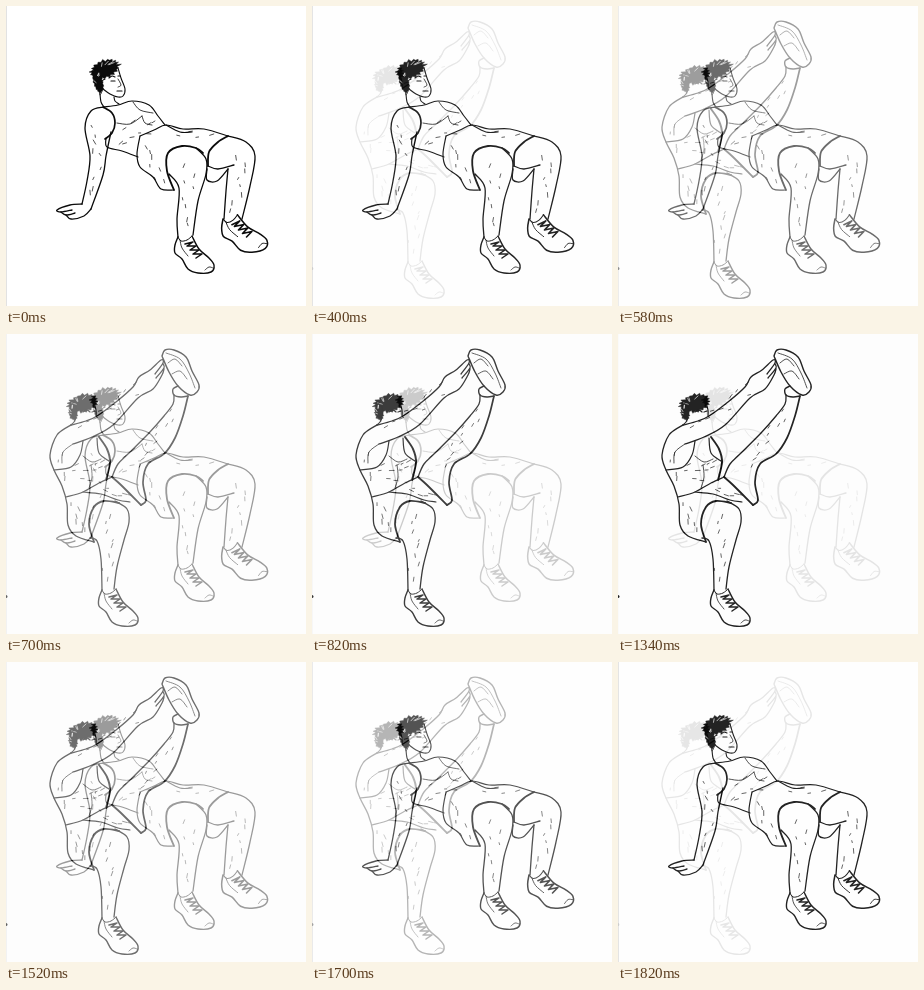
Animation, 300 px wide and 300 px high, one loop 1880 ms. Source, as an HTML page:

```html
<!DOCTYPE html>
<html lang="en">
<head>
<meta charset="utf-8">
<title>Crab toe touch</title>
<style>
  html, body { margin: 0; width: 100%; height: 100%; overflow: hidden; background: #fdfdfd; }
  svg { display: block; width: 100vw; height: 100vh; }
  path { fill: none; stroke: #0b0b0b; stroke-linecap: round; stroke-linejoin: round; }
  .ink { fill: #0b0b0b; stroke-width: .4; }
  .gap { stroke: #fff; }
  #rest { animation: fade 1880ms infinite; }
  /* nine 60 ms steps each way, with a hold at both ends */
  @keyframes fade {
    0% { opacity: 1; animation-timing-function: step-end; }
    21.2766% { opacity: .9; animation-timing-function: steps(9, end); }
    50% { opacity: 0; animation-timing-function: step-end; }
    71.2766% { opacity: .1; animation-timing-function: steps(9, end); }
    100% { opacity: 1; }
  }
</style>
</head>
<body>
<svg viewBox="0 0 300 300">
  <g id="reach"><circle class="ink" cy="262.5" r="1.5"/></g>
  <g id="rest">
    <rect width="300" height="300" fill="#fff"/>
    <path d="M.5 0V300" style="stroke:#e2e2e2"/>
  </g>
</svg>
<script>
const NS = 'http://www.w3.org/2000/svg';
let layer, seed = 7;

function rand(lo, hi) {
  seed = (seed * 16807) % 2147483647;
  return lo + (hi - lo) * seed / 2147483647;
}

function add(d, attrs) {
  const el = document.createElementNS(NS, 'path');
  el.setAttribute('d', d);
  for (const k in attrs) el.setAttribute(k, attrs[k]);
  layer.append(el);
}

// Smooth curve through a few key points
function curve(text) {
  const p = text.split(' ').map(s => s.split(',').map(Number));
  const bend = (a, b, c) => [0, 1].map(k => a[k] + (b[k] - c[k]) / 6);
  return 'M' + p[0] + p.slice(1).map((c, i) => {
    const b = p[i], before = p[i - 1] || b, after = p[i + 2] || c;
    return 'C' + [bend(b, c, before), bend(c, b, after), c];
  }).join('');
}

function draw(width, ...lines) {
  for (const line of lines) add(curve(line), { 'stroke-width': width });
}

// Loose muscle and cloth marks scattered along an axis
function marks(x1, y1, x2, y2, spread, count) {
  const dx = x2 - x1, dy = y2 - y1, len = Math.hypot(dx, dy);
  for (let i = 0; i < count; i++) {
    const t = (i + rand(.2, .8)) / count, side = rand(-spread, spread);
    const x = x1 + dx * t - dy / len * side, y = y1 + dy * t + dx / len * side;
    const a = Math.atan2(dy, dx) + rand(-.4, .4), r = rand(2, 5);
    add(`M${x} ${y}l${r * Math.cos(a)} ${r * Math.sin(a)}`, { 'stroke-width': .7 });
  }
}

// Ragged black oval with a few light strands
function hair(cx, cy, rx, ry, tilt) {
  const at = (a, r) => [rx * r * Math.cos(a), ry * r * Math.sin(a)];
  const transform = `translate(${cx} ${cy}) rotate(${tilt})`;
  const rim = Array.from({ length: 38 }, (_, i) =>
    at(i * Math.PI / 19, i % 2 ? rand(1, 1.25) : rand(.85, .98)));
  add('M' + rim.join('L') + 'Z', { class: 'ink', transform });
  for (let i = 0; i < 4; i++) {
    const a = rand(2.6, 5.8);
    add(`M${at(a, .5)}L${at(a + .3, .85)}`, { class: 'gap', 'stroke-width': .6, transform });
  }
}

function shoe(x, y, turn, size) {
  const transform = `translate(${x} ${y}) rotate(${turn}) scale(${size})`;
  const part = (d, width) => add(d, { 'stroke-width': width, transform });
  part(curve('0,0 -3,8 -3,16 4,22 10,32 20,36 33,35 36,28 31,21 21,12 14,-1'), 1.4);
  part(curve('0,0 3,4 9,3 14,-1'), 1);
  part(curve('2,3 4,11 10,19'), .8);
  part(curve('27,33 31,30 35,31'), .8);
  let laces = 'M7 7';
  for (let i = 0; i < 4; i++) laces += `L${15 + 3 * i} ${5 + 4 * i}L${9 + 3 * i} ${9 + 4 * i}`;
  part(laces, 1.5);
}

function restPose() {
  // head
  hair(99, 63, 14, 8, -22);
  hair(92, 75, 4.5, 12, -14);
  draw(1.1, '112,62 115,72 119,83 117,90 112,91 104,88 97,83',
    '99,73 95,76 97,83', '94,88 95,96 98,101', '108,91 109,95 113,98');
  draw(1.2, '103,72 106,70 109,71', '105,75 109,75', '112,70 114,70', '111,85 116,85');
  draw(.8, '112,73 115,79 112,81');
  // supporting arm and hand
  draw(1.3, '98,101 85,105 79,122 84,150 81,175 76,198',
    '105,126 100,150 97,169 85,203',
    '76,198 64,199 51,204 55,206 66,204', '55,206 60,209 69,207',
    '60,209 65,213 78,210 85,203');
  marks(84, 118, 92, 150, 4, 5);
  marks(92, 158, 82, 190, 4, 4);
  // torso
  draw(1.7, '97,101 106,107 109,117 106,127 99,133');
  draw(1.2, '98,101 112,99 126,95 143,99 152,110 159,119', '100,132 101,141 116,145 132,151');
  draw(.8, '127,96 134,104 147,107', '111,117 124,118 136,110', '136,110 139,117 146,119');
  marks(108, 132, 148, 118, 9, 9);
  // shorts
  draw(1.2, '134,130 148,124 160,119 177,123 198,123 222,130',
    '134,130 131,148 134,161 147,171 155,183 168,184', '160,119 174,126 186,126');
  draw(1.8, '168,184 161,165 162,147 176,140 190,142 197,147', '202,160 203,146 212,136 222,130');
  marks(138, 135, 156, 178, 5, 7);
  marks(165, 129, 208, 130, 4, 4);
  // legs
  draw(1.3, '190,142 200,153 200,168 192,195 187,229', '163,168 173,182 171,213 172,231',
    '222,130 240,136 249,150 244,180 236,213',
    '202,160 212,163 228,159', '201,163 201,174 211,175 222,163', '222,163 220,185 218,213');
  marks(184, 152, 180, 222, 6, 8);
  marks(236, 145, 228, 205, 6, 8);
  shoe(172, 231, 0, 1);
  shoe(217, 213, -12, 1.07);
}

function reachPose() {
  // head
  hair(77, 69, 14, 8, -12);
  hair(67, 78, 4, 8, -8);
  draw(1.1, '88,69 90,76 90,82', '70,84 68,88 65,91');
  draw(1.3, '77,78 81,76 84,78', '86,78 89,77');
  // arm and fingers
  draw(1.3, '65,91 80,87 91,82 110,68 127,53 133,43 144,36 155,26 157,29 149,40',
    '157,30 158,34 150,44', '158,35 156,41 147,55 132,64 107,91 86,103 67,110');
  marks(72, 98, 135, 52, 6, 10);
  // torso
  draw(1.3, '65,91 51,101 44,121 48,136 56,152 61,170 62,191 70,202 88,208');
  draw(1.2, '77,107 74,121 65,133 48,136');
  draw(1.9, '93,103 101,115 104,128 100,146');
  draw(1.2, '91,104 93,119 103,127');
  draw(.8, '67,110 57,118 56,129', '77,122 86,128 95,125', '85,131 86,143 83,154');
  marks(66, 140, 98, 136, 9, 10);
  marks(53, 112, 58, 150, 3, 4);
  // shorts
  draw(1.2, '60,163 77,158 93,149 106,143', '77,158 95,160 112,166 124,168');
  draw(1.8, '88,208 83,190 88,173 98,167 113,169', '106,143 115,151 135,171');
  marks(68, 166, 76, 196, 5, 6);
  marks(94, 155, 124, 162, 4, 6);
  // raised leg and foot
  draw(1.3, '106,143 112,130 123,119 143,99 158,82 167,70 168,61');
  draw(1.7, '135,171 140,166 137,148 142,130 158,120 169,104 177,82 182,62');
  marks(128, 135, 170, 75, 6, 10);
  draw(1.4, '156,22 159,16 168,16 180,23 186,37 193,51 191,58 184,61 172,52 163,38 156,22',
    '172,52 167,55 168,61 175,63 182,62');
  draw(.8, '160,19 174,25 183,39 189,54', '162,29 169,25 176,32', '166,40 174,37 181,45');
  // standing leg
  draw(1.3, '109,167 121,175 123,188 118,206 111,233 108,255',
    '84,204 91,207 95,225 96,256');
  marks(106, 176, 102, 246, 7, 9);
  shoe(96, 256, 0, 1);
}

layer = document.getElementById('rest');
restPose();
layer = document.getElementById('reach');
reachPose();
</script>
</body>
</html>
```
